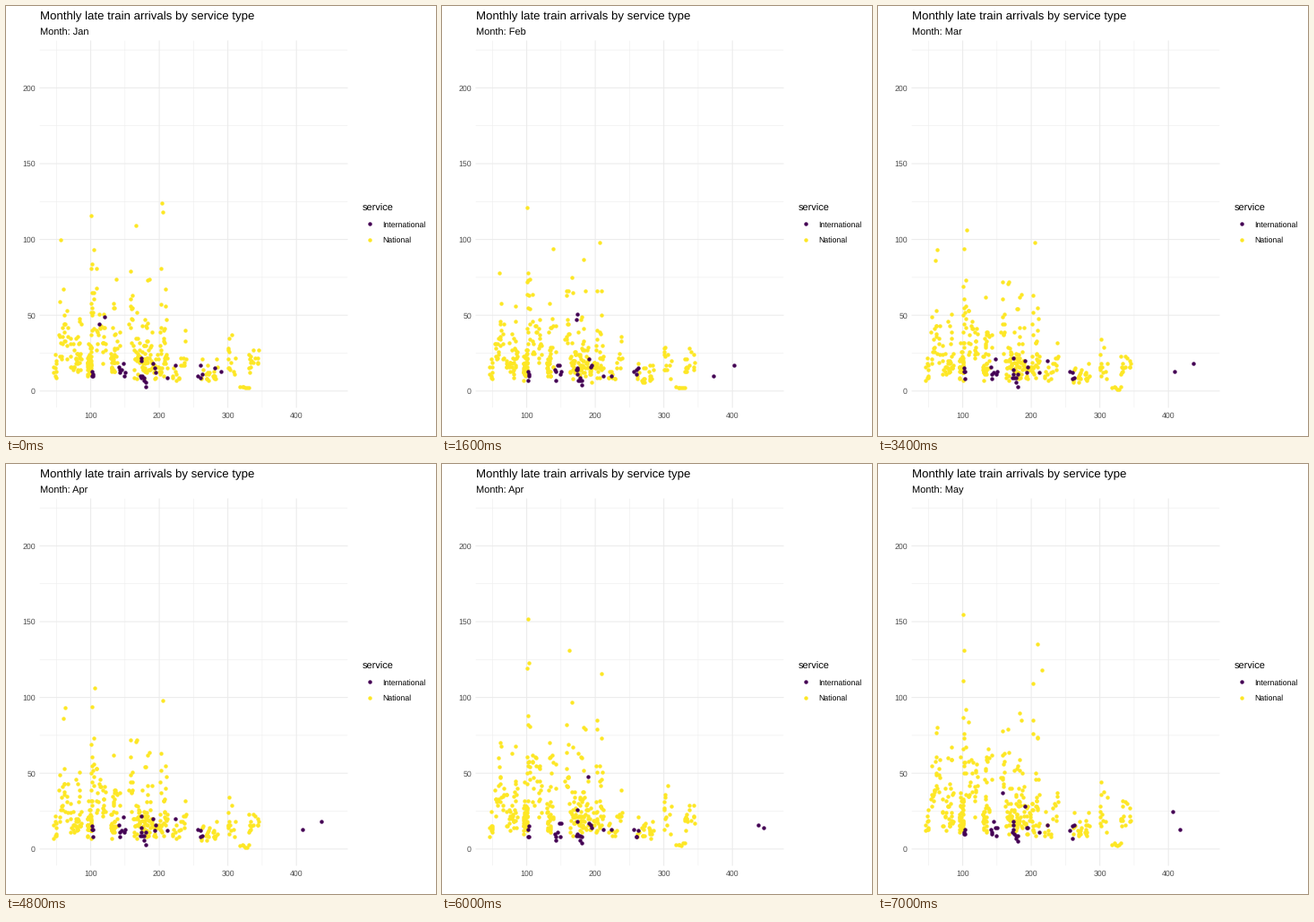
A matplotlib script for the animation above (8 s loop, 480 by 480 pixels).

```python
import matplotlib.pyplot as plt
import numpy as np
from matplotlib.animation import FuncAnimation

SIZE = 480
STEP_MS = 200
FRAMES = 40
MONTH_MS = 1800
LEFT, RIGHT, TOP, BOTTOM = 38, 381, 39, 448
PURPLE, YELLOW = "#440154", "#FDE725"
GRID, TICK = "#EBEBEB", "#4D4D4D"
DOT = dict(s=4.4 ** 2, linewidths=0)

# Routes: shortest and longest trip, usual number of late trains, stations
NATIONAL = [
    (46, 49, 14, 9), (52, 58, 46, 5), (58, 66, 38, 14), (70, 87, 20, 28),
    (78, 86, 40, 6), (95, 101, 19, 38), (97, 115, 46, 22), (118, 122, 32, 11),
    (129, 135, 20, 20), (132, 143, 42, 15), (156, 162, 42, 10),
    (163, 172, 20, 22), (175, 185, 18, 30), (187, 198, 17, 18),
    (175, 190, 42, 10), (199, 211, 18, 18), (201, 212, 42, 10),
    (220, 228, 13, 8), (230, 239, 23, 9), (260, 285, 12, 22),
    (300, 311, 22, 13), (314, 333, 3, 6), (329, 345, 21, 15),
    (60, 68, 68, 4), (100, 108, 78, 5), (158, 210, 66, 8),
]
INTERNATIONAL = [
    (99, 103, 13, 4), (141, 150, 12, 7), (171, 175, 17, 5),
    (178, 182, 8, 4), (187, 202, 20, 3), (209, 224, 13, 2), (254, 263, 12, 4),
]

# Name, overall level, and the stations that stand out for each service
MONTHS = [
    ("Jan", 1.0, [(101, 116), (204, 124), (205, 118), (56, 100)],
     [(120, 49), (112, 44), (281, 15), (290, 13)]),
    ("Feb", 0.9, [(101, 121), (138, 94), (206, 98)],
     [(174, 51), (173, 47), (372, 10), (403, 17)]),
    ("Mar", 0.88, [(106, 106), (102, 94), (205, 98)],
     [(409, 13), (436, 18)]),
    ("Apr", 1.08, [(102, 152), (103, 123), (162, 131), (209, 116)],
     [(190, 48), (437, 16), (445, 14)]),
    ("May", 1.15, [(101, 155), (102, 131), (209, 135), (215, 118)],
     [(158, 37), (406, 25), (417, 13)]),
]


def to_pixels(x, y):
    return 18.0 + 0.7655 * x, 429.8 - 1.692 * y


def delays(routes, level, month):
    """Stations keep their trip time; their counts vary from month to month."""
    stations = np.random.default_rng(7)
    monthly = np.random.default_rng(100 + month)
    parts = []
    for shortest, longest, usual, count in routes:
        x = stations.integers(shortest, longest + 1, count)
        spread = 0.85 * stations.normal(size=count) + 0.5 * monthly.normal(size=count)
        y = usual * level * np.exp(0.35 * np.clip(spread, -2.5, 1.6))
        parts.append(np.column_stack([x, np.round(y)]))
    return np.vstack(parts)


def positions(routes, level, month, standouts):
    points = np.vstack([delays(routes, level, month), standouts])
    return np.column_stack(to_pixels(*points.T))


national_by_month = [positions(NATIONAL, level, i, peaks)
                     for i, (_, level, peaks, _) in enumerate(MONTHS)]
international_by_month = [positions(INTERNATIONAL, 1, i, far)
                          for i, (_, _, _, far) in enumerate(MONTHS)]

plt.rcParams.update({"font.family": "Liberation Sans", "text.hinting": "none"})
fig = plt.figure(figsize=(SIZE / 72, SIZE / 72), dpi=72, facecolor="white")
ax = fig.add_axes([0, 0, 1, 1])
ax.axis("off")


def label(x, y, text, size, color="black", ha="left"):
    return ax.text(x, y, text, fontsize=size, color=color, ha=ha, va="baseline")


def grid_line(xs, ys, major):
    ax.plot(xs, ys, color=GRID, lw=1.07 if major else 0.53, zorder=0, snap=False)


for value in range(50, 401, 50):
    x, _ = to_pixels(value, 0)
    major = value % 100 == 0
    grid_line([x, x], [TOP, BOTTOM], major)
    if major:
        label(x, 460, str(value), 8.8, TICK, "center")
for value in range(0, 226, 25):
    _, y = to_pixels(0, value)
    major = value % 50 == 0
    grid_line([LEFT, RIGHT], [y, y], major)
    if major:
        label(33, y + 3.4, str(value), 8.8, TICK, "right")

label(38, 15, "Monthly late train arrivals by service type", 13.2)
subtitle = label(38, 33, "", 11)
label(398, 229, "service", 11)
for service, color, y in (("International", PURPLE, 243.3), ("National", YELLOW, 260.5)):
    ax.scatter([406.3], [y], color=color, **DOT)
    label(420.5, y + 3.5, service, 8.8)

national = ax.scatter([], [], color=YELLOW, zorder=2, **DOT)
international = ax.scatter([], [], color=PURPLE, zorder=3, **DOT)
ax.set_xlim(0, SIZE)
ax.set_ylim(SIZE, 0)


def update(frame):
    time = frame * STEP_MS
    # The subtitle changes 400 ms before the points do.
    named = (time + 600) // MONTH_MS
    shown = (time + 200) // MONTH_MS
    subtitle.set_text(f"Month: {MONTHS[named][0]}")
    national.set_offsets(national_by_month[shown])
    international.set_offsets(international_by_month[shown])
    return subtitle, national, international


animation = FuncAnimation(fig, update, frames=FRAMES, interval=STEP_MS,
                          repeat=True, repeat_delay=0)
plt.show()
```
